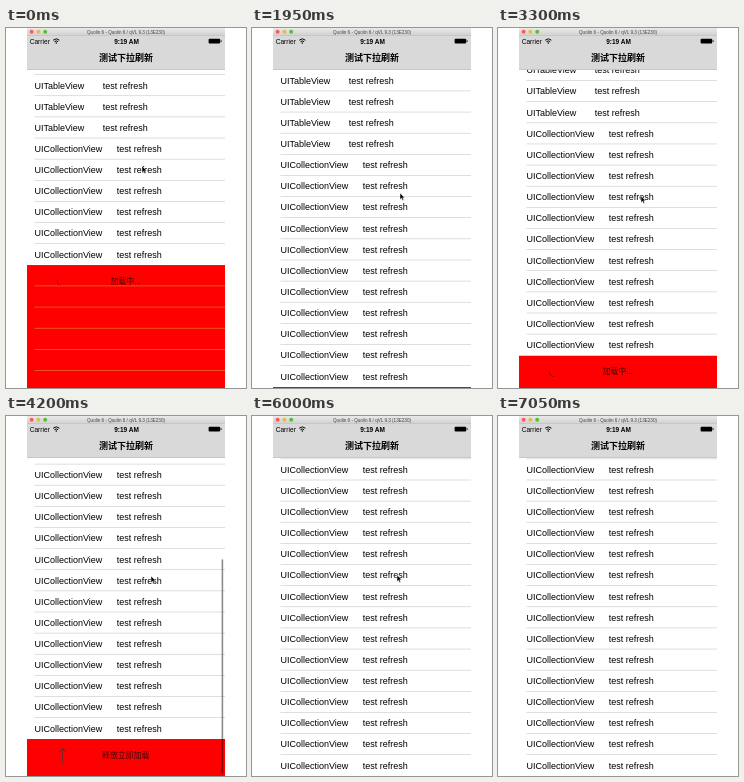
Write an HTML page that moves like this. It is 240 px wide and 360 px high and loops after 7500 ms.

```html
<!DOCTYPE html>
<html lang="zh">
<head>
<meta charset="utf-8">
<title>测试下拉刷新</title>
<style>
  html, body { margin: 0; width: 100%; height: 100%; overflow: hidden; background: #fff; }
  svg { display: block; width: 240px; height: 360px; }
  text { font-family: "Liberation Sans", Arial, sans-serif; fill: #000; }
  .row { font-size: 9px; }
  .cjk { font-family: "Noto Sans CJK SC", "Noto Sans CJK", sans-serif; text-anchor: middle; }
  .mid { text-anchor: middle; }
</style>
</head>
<body>
<svg viewBox="0 0 240 360" xmlns="http://www.w3.org/2000/svg">
  <defs>
    <linearGradient id="bar" x2="0" y2="1">
      <stop offset="0" stop-color="#e9e9e9"/>
      <stop offset="1" stop-color="#d0d0d0"/>
    </linearGradient>
    <clipPath id="view"><rect x="21" y="41.8" width="198" height="318.2"/></clipPath>
  </defs>

  <g clip-path="url(#view)">
    <g id="footer">
      <rect x="21" width="198" height="330" fill="#fe0000"/>
      <text id="label" class="cjk" x="119.7" y="19" font-size="7.9" style="fill:#3a0808"></text>
      <path id="spinner" d="M-3.6 -3A4.7 4.7 0 0 1 3.6 -3" fill="none" stroke="#8c0a0a" stroke-width=".8"/>
      <path id="arrow" d="M56.5 24V9.6M53.2 13.6L56.5 9.6L59.8 13.6" fill="none" stroke="#6e2424" stroke-width=".9"/>
    </g>
    <g id="list"></g>
    <rect id="thumb" x="215.6" width="1.6" rx=".8" fill="#000" fill-opacity=".45"/>
  </g>

  <rect x="21" y="7.5" width="198" height="34" fill="#d9d9d9"/>
  <rect x="21" y="41.2" width="198" height=".6" fill="#b0b0b0"/>
  <rect x="21" width="198" height="7.7" fill="url(#bar)"/>
  <rect x="21" y="7.4" width="198" height=".5" fill="#b4b4b4"/>
  <circle cx="25.6" cy="3.7" r="2" fill="#fc5b57"/>
  <circle cx="32.4" cy="3.7" r="2" fill="#e5bf3c"/>
  <circle cx="39.2" cy="3.7" r="2" fill="#57c038"/>
  <text class="mid" x="120" y="5.5" font-size="4.6" style="fill:#444">Quolin 6 - Quolin 6 / qVL 9.3 (13E230)</text>

  <text x="23.7" y="15.5" font-size="6.6">Carrier</text>
  <g fill="none" stroke="#000" stroke-width="1">
    <path d="M47.2 12.2Q50.3 9.4 53.4 12.2M48.5 13.7Q50.3 12.1 52.1 13.7"/>
  </g>
  <circle cx="50.3" cy="15" r=".8"/>
  <text class="mid" x="120.5" y="15.5" font-size="6.5" font-weight="bold">9:19 AM</text>
  <rect x="202.6" y="10.7" width="11.6" height="4.8" rx="1"/>
  <rect x="214.7" y="12.2" width=".8" height="1.8"/>
  <text class="cjk" x="120" y="33.4" font-size="9" font-weight="bold">测试下拉刷新</text>

  <path id="cursor" d="M0 0V6.6L1.5 5.3L2.5 7.6L3.7 7.1L2.7 4.8H4.7Z" stroke="#fff" stroke-width=".5"/>
</svg>

<script>
const LOOP = 7500, STEP = 150, LAST = 47;
const TOP = 42, VIEW = 318, ROW = 21.13, TABLE_ROWS = 4;

// [step, scroll offset]
const scrollKeys = [
  [0, 16.3], [1, 1], [2, 0], [13, 0], [14, 17.5], [15, 33], [16, 31.5], [23, 31.5],
  [25, 58], [27, 110], [28, 120.5], [29, 115.5], [35, 115.5], [37, 160], [39, 186],
  [40, 189.1], [42, 189.1], [43, 199], [44, 203], [45, 194], [46, 190], [47, 189.1]
];
// [step, x, y]
const cursorKeys = [
  [0, 136, 138], [4, 142, 152], [9, 146, 162], [13, 148, 165], [15, 153, 130],
  [19, 148, 152], [22, 143, 168], [24, 145, 196], [28, 145, 160], [34, 145, 176],
  [36, 145, 190], [40, 145, 159], [42, 145, 159]
];
// [first step, row count]
const pages = [[0, 10], [11, 15], [23, 19], [35, 24]];
// [first step, end step, start angle]
const loads = [[0, 11, 235], [15, 23, 0], [29, 35, 0]];
// steps with a visible scroll indicator
const thumbSpans = [[14, 15], [24, 29], [36, 39], [43, 45]];

const $ = id => document.getElementById(id);
const list = $('list'), footer = $('footer'), label = $('label'), spinner = $('spinner'),
      arrow = $('arrow'), thumb = $('thumb'), cursor = $('cursor');

function add(name, attrs, text = '') {
  const node = document.createElementNS('http://www.w3.org/2000/svg', name);
  for (const key in attrs) node.setAttribute(key, attrs[key]);
  node.textContent = text;
  list.append(node);
  return node;
}

const rows = Array.from({ length: 24 }, (_, i) => {
  const inTable = i < TABLE_ROWS, y = i * ROW, base = y + 13.7;
  return [
    add('rect', { x: 21, y, width: 198, height: ROW + .05, fill: '#fff' }),
    add('text', { class: 'row', x: 28.4, y: base }, inTable ? 'UITableView' : 'UICollectionView'),
    add('text', { class: 'row', x: inTable ? 96.7 : 110.8, y: base }, 'test refresh')
  ];
});
const lines = rows.map((_, i) =>
  add('rect', { x: 28.5, y: (i + 1) * ROW - .5, width: 190.5, height: .6 }));

function sample(keys, k) {
  const n = keys.findIndex(key => key[0] >= k);
  if (n < 0) return keys[keys.length - 1].slice(1);
  if (n === 0) return keys[0].slice(1);
  const a = keys[n - 1], b = keys[n], p = (k - a[0]) / (b[0] - a[0]);
  return a.slice(1).map((v, i) => v + (b[i + 1] - v) * p);
}

const show = (node, on) => { node.style.display = on ? '' : 'none'; };
const move = (node, x, y, more = '') =>
  node.setAttribute('transform', `translate(${x} ${y})${more}`);

function draw(time) {
  const k = Math.min(LAST, Math.floor(time % LOOP / STEP));
  const [scroll] = sample(scrollKeys, k);
  const count = pages.filter(p => p[0] <= k).pop()[1];
  const height = count * ROW;

  move(list, 0, TOP - scroll);
  rows.forEach((parts, i) => parts.forEach(part => show(part, i < count)));
  // A short list also shows the separators of its empty rows.
  lines.forEach((line, i) => {
    show(line, i < count || count === 10);
    line.setAttribute('fill', i < count - 1 ? '#c8c7cc' : i < count ? 'none' : '#e0863c');
  });

  const load = loads.find(l => k >= l[0] && k < l[1]);
  show(footer, count < 24);
  move(footer, 0, TOP + height - scroll);
  label.textContent = load ? '加载中...' : '释放立即加载';
  show(spinner, load);
  show(arrow, !load);
  if (load) move(spinner, 56, 16.3, ` rotate(${load[2] + (k - load[0]) * STEP * .558})`);

  show(thumb, thumbSpans.some(([a, b]) => k >= a && k <= b));
  const over = Math.max(0, scroll - Math.max(0, height - VIEW));
  const size = Math.min(VIEW, VIEW * VIEW / height) - over;
  const y = over ? 358 - size : TOP + 1 + scroll / height * 316;
  thumb.setAttribute('y', y);
  thumb.setAttribute('height', size);

  show(cursor, k <= 42);
  move(cursor, ...sample(cursorKeys, k));
}

const start = performance.now();
function tick() {
  draw(performance.now() - start);
  requestAnimationFrame(tick);
}
tick();
</script>
</body>
</html>
```
